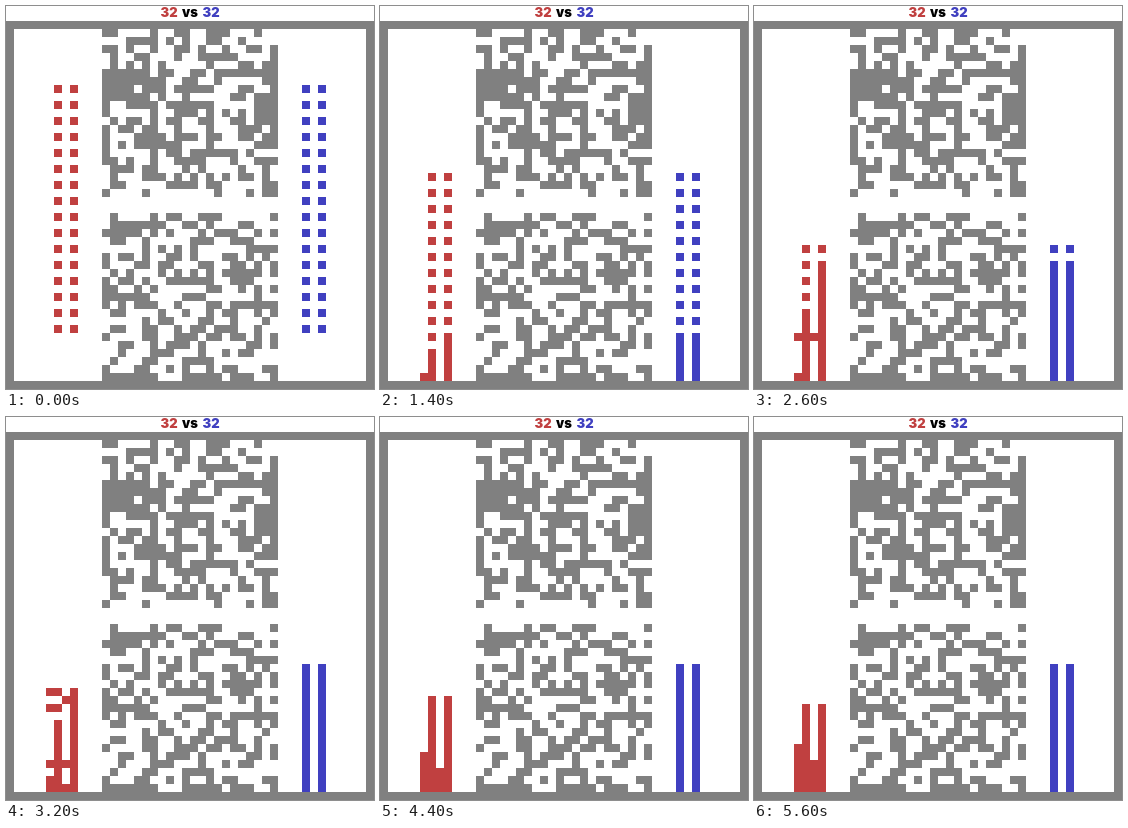
These frames come from a looping animation (368x383 px, 8 s). An HTML page:

```html
<!DOCTYPE html>
<html lang="en">
<head>
<meta charset="utf-8">
<title>32 vs 32</title>
<style>
  html, body { margin: 0; width: 100%; height: 100%; overflow: hidden; background: #fff; }
  svg { display: block; width: 100vw; height: 100vh; }
  text { font: 900 13px Inter, "DejaVu Sans", sans-serif; }
  .wall { fill: none; stroke: #808080; stroke-linecap: square; }
  .red { fill: #c04040; }
  .blue { fill: #4040c0; }
</style>
</head>
<body>
<svg viewBox="0 0 368 383">
  <text y="11"><tspan class="red" x="154.5">32</tspan><tspan x="176">vs</tspan><tspan class="blue" x="196.5">32</tspan></text>
  <g transform="translate(0 15) scale(8)" shape-rendering="crispEdges">
    <path class="wall" d="M.5 .5h45v45h-45z"/>
    <path id="rubble" fill="#808080"/>
    <path class="wall" transform="translate(12.5 1.5)"
      d="M0 5h4M0 6h4M0 7h3M0 8h3M15 5h6M6 10v6M9 9v5M13 10v4M1 24h3M1 25h3M1 43h3"/>
    <path class="red" id="red"/>
    <path class="blue" id="blue"/>
  </g>
</svg>
<script>
const LOOP = 8000, FIRST = 200, STEP = 600;
const ARMY = 32, FLOOR = 45, SPEED = 5;
const FALL = [0, 2, 6, 11, 16, 20, 24];

// Units that slip out of the red files: step and row of each slip.
const LEFT = [[3, 44], [5, 39], [6, 41], [6, 34], [6, 32], [9, 37]];
const RIGHT = [[5, 39], [6, 41], [6, 33], [9, 38]];

const $ = id => document.getElementById(id);
const cell = (x, y) => `M${x} ${y}h1v1h-1z`;

// Random blocks in the middle, with a free lane across.
function rubble(seed) {
  let d = '';
  for (let y = 1; y < FLOOR; y++)
    for (let x = 12; x < 34; x++) {
      seed = (seed * 1664525 + 1013904223) % 2 ** 32;
      if (seed < 0.47 * 2 ** 32 && y !== 22 && y !== 23) d += cell(x, y);
    }
  return d;
}

// A file of spaced units sinks and packs together on the floor.
function file(x, fall, count) {
  let d = '';
  for (let i = 0; i < count; i++)
    d += cell(x, Math.min(8 + 2 * i + fall, FLOOR - count + i));
  return d;
}

// Slipped units drop at a steady speed and stack up.
const spill = (x, units, step) => units.map(([from, row], i) =>
  cell(x, Math.min(FLOOR - 1 - i, row + SPEED * (step - from)))).join('');

function redHeap(step, fall) {
  const slipped = ([from]) => from <= step;
  const left = LEFT.filter(slipped), right = RIGHT.filter(slipped);
  const lost = left.length + right.length, rest = ARMY - lost;
  // The left file loses units first, then the two files level out.
  const near = Math.max(ARMY / 2 - lost, Math.min(rest >> 1, 5 + step));
  return spill(5, left, step) + file(6, fall, near) +
         spill(7, right, step) + file(8, fall, rest - near);
}

let shown = -1;
function draw(time) {
  const t = time % LOOP;
  const step = t < FIRST ? 0 : Math.min(10, 1 + Math.floor((t - FIRST) / STEP));
  if (step === shown) return;
  shown = step;
  const fall = FALL[step] ?? FLOOR;
  $('red').setAttribute('d', redHeap(step, fall));
  $('blue').setAttribute('d', file(37, fall, ARMY / 2) + file(39, fall, ARMY / 2));
}

$('rubble').setAttribute('d', rubble(32));
draw(0);
const start = performance.now();
requestAnimationFrame(function tick() {
  draw(performance.now() - start);
  requestAnimationFrame(tick);
});
</script>
</body>
</html>
```
